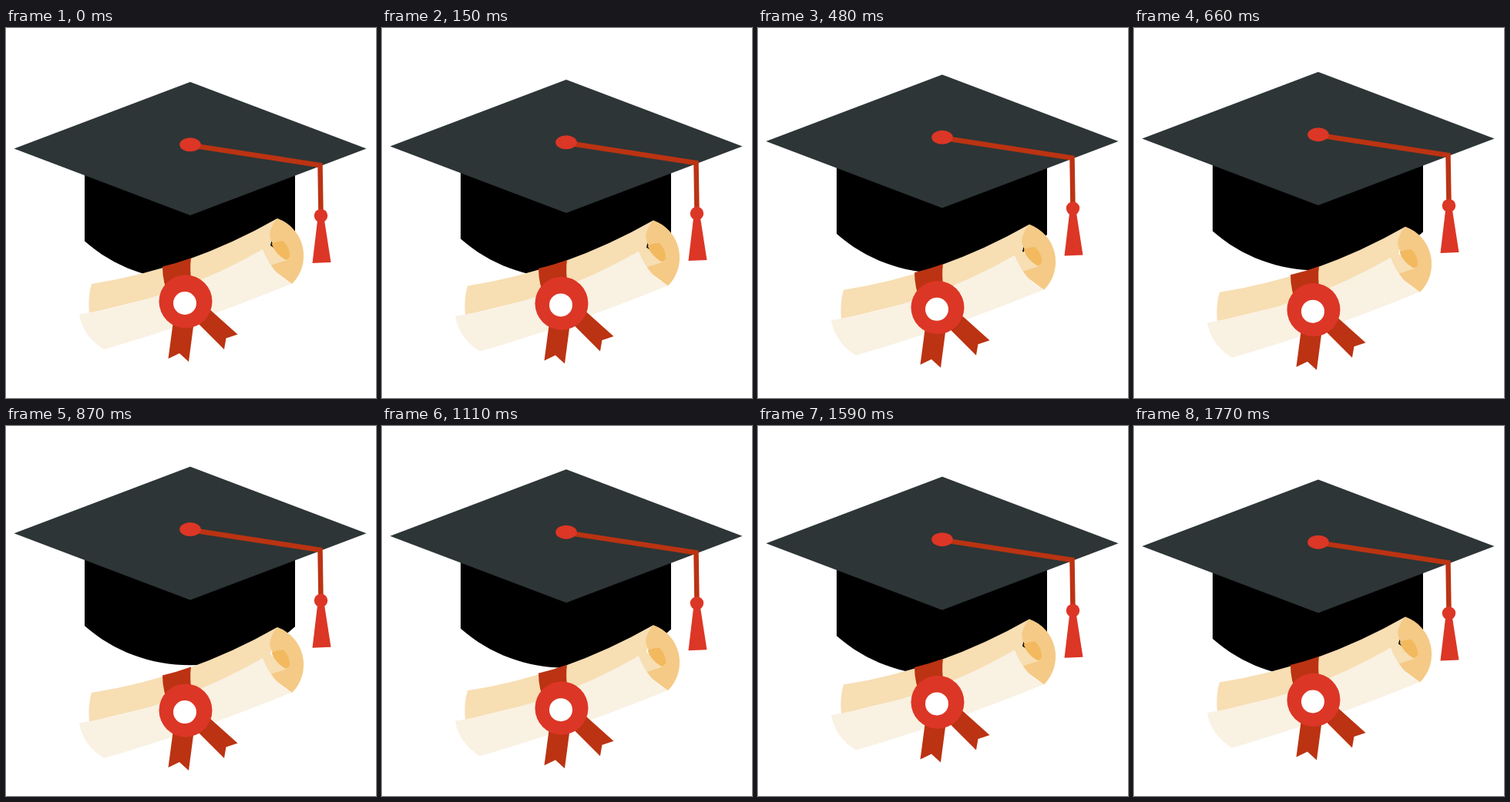
Recreate the animation shown at these times as an HTML page. Size 480x480 px, loop 1.8 s.

```html
<!DOCTYPE html>
<html lang="en">
<head>
<meta charset="utf-8">
<title>Graduation cap and diploma</title>
<style>
  html, body { margin: 0; height: 100%; overflow: hidden; background: #fff; }
  svg { display: block; width: 100%; height: 100%; }
  .bright { fill: #dc3626; }
  .ribbon { fill: #bb3312; }
  .cord { fill: none; stroke: #bb3312; stroke-width: 6.5; }
</style>
</head>
<body>
<svg viewBox="0 0 480 480">
  <g id="cap">
    <path d="M102 170V276.500C140 310 188 327.500 239 327.500S337 312 375 277.500V170Z"/>
    <path fill="#2d3536" d="M239 70L467.500 156.500L239 243L10.500 156.500Z"/>
    <path class="cord" d="M239 152L407.500 178L408.500 240"/>
    <ellipse class="bright" cx="239" cy="151.300" rx="13.800" ry="9"/>
    <path class="bright" d="M404.500 246H412.500L421.500 304L397.500 305Z"/>
    <circle class="bright" cx="408.500" cy="243.500" r="8.700"/>
  </g>
  <g id="diploma">
    <path fill="#f7deb3" d="M111 332Q237 312.500 352 247L343 282L368 300L345 312L108 370Q106 348 111 332Z"/>
    <path fill="#f5ca86" d="M352 247A51.500 51.500 0 0 1 371 332L340 309L365 301Q336 277 344 260Q347 252 352 247Z"/>
    <path fill="#f2b95f" d="M344.500 280Q352 276 360 276.500Q369 286 368 297L363 301Q349 293 344.500 280Z"/>
    <path fill="#f9f1e2" d="M95 371.500Q222 351 333 287C341 308 354 324 371 331.500Q245 383 127 417Q100 400 95 371.500Z"/>
    <path class="ribbon" d="M203 309.500Q222 305 240 298.500Q238 312 241 335L212 350Q203 330 203 309.500Z"/>
    <path class="ribbon" d="M217 380L210.500 429L225 422L237 433L244 380Z"/>
    <path class="ribbon" d="M246 380L283 417L285.500 402.500L300.500 397.500L262 363Z"/>
    <circle class="bright" cx="233" cy="354.800" r="34.500"/>
    <circle fill="#fff" cx="232" cy="357" r="15"/>
  </g>
</svg>
<script>
  const LOOP = 1800, STEP = 30;
  const cap = document.getElementById('cap');
  const diploma = document.getElementById('diploma');
  const moveY = (part, y) => part.setAttribute('transform', `translate(0 ${y})`);

  // The two parts drift apart and back at constant speed.
  function draw() {
    const t = Math.floor(performance.now() % LOOP / STEP) * STEP;
    const apart = 1 - Math.abs(t / (LOOP / 2) - 1);
    moveY(cap, -17.8 * apart);
    moveY(diploma, 14.6 * apart);
    requestAnimationFrame(draw);
  }
  draw();
</script>
</body>
</html>
```
